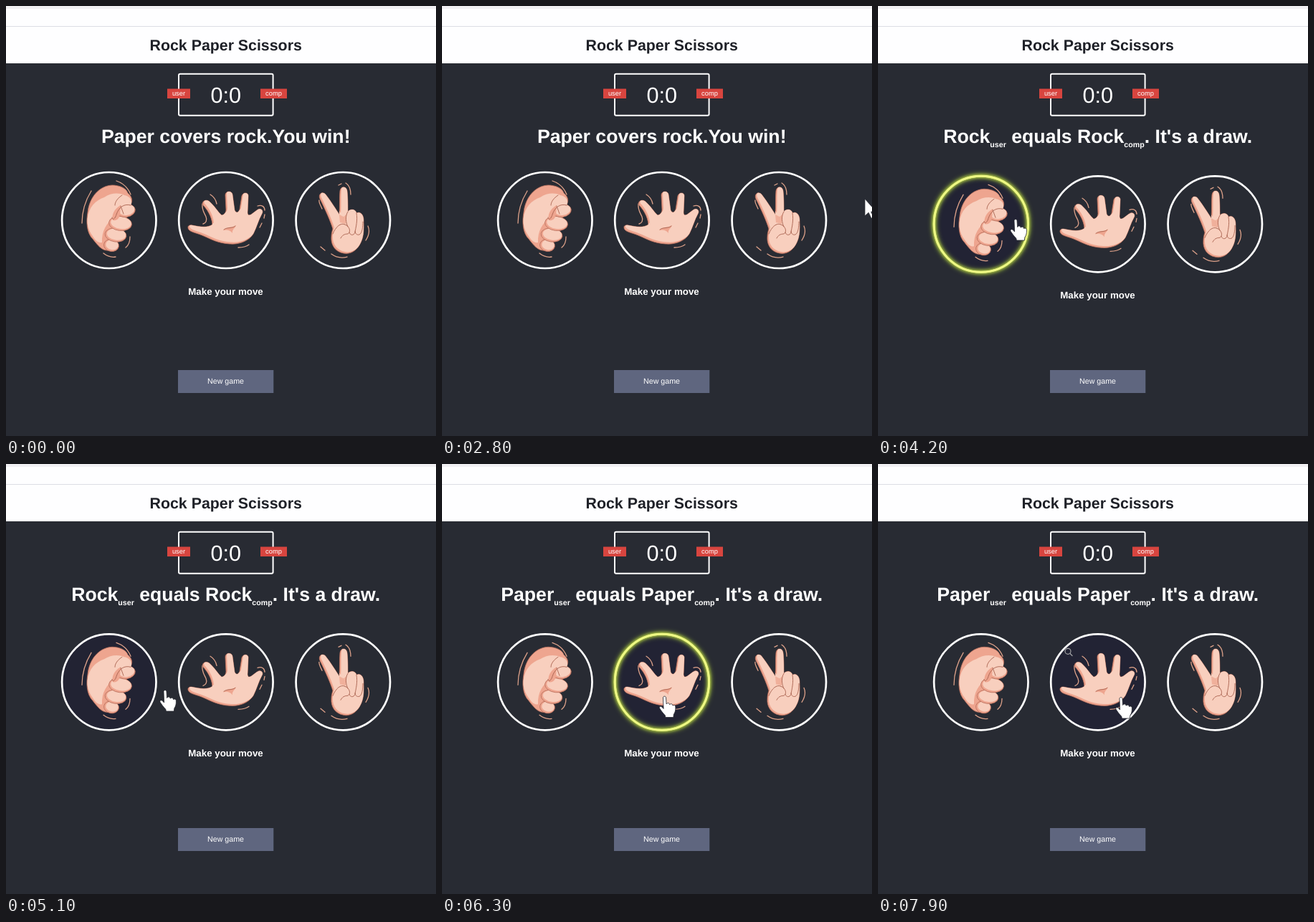
Animation of 600 by 600 pixels, one loop 8000 ms. Source, as an HTML page:

```html
<!DOCTYPE html>
<html lang="en">
<head>
<meta charset="utf-8">
<title>Rock Paper Scissors</title>
<style>
  html, body { margin: 0; width: 100%; height: 100%; overflow: hidden; background: #282b33; }
  svg { display: block; width: 100vw; height: 100vh; }
  text { font-family: "Liberation Sans", Arial, sans-serif; fill: #fff; text-anchor: middle; text-rendering: geometricPrecision; }
  .bold { font-weight: 700; }
  .title { font-size: 21.33px; fill: #1f2128; }
  .score { font-size: 30.67px; }
  .badge { font-size: 9.33px; }
  .result { font-size: 26.67px; }
  .sub { font-size: 10.67px; }
  .message { font-size: 13.33px; }
  .button { font-size: 10.67px; }
  .ring { fill: none; stroke: #fff; stroke-width: 2.7; }
  .fill { fill: #222334; }
  .glow { fill: none; stroke: #eef884; stroke-width: 3; filter: drop-shadow(0 0 2px #d8f04c) drop-shadow(0 0 3px #a9cf3c); }
  .base { fill: #eea58f; stroke: #b9705d; stroke-width: .8; }
  .light { fill: #f8cfbe; }
  .crease { fill: none; stroke: #a9614f; stroke-width: .9; stroke-linecap: round; }
  .shade { fill: #eea58f; }
  .shake { fill: none; stroke: #dda189; stroke-width: 1.3; stroke-linecap: round; }
  .pointer { fill: #fff; stroke: #23252c; stroke-width: .8; stroke-linejoin: round; }
</style>
</head>
<body>
<svg viewBox="0 0 600 600">
  <rect width="600" height="600" fill="#282b33"/>
  <rect width="600" height="80" fill="#fefeff"/>
  <rect width="600" height="4" fill="#f1f0f3"/>
  <rect y="28" width="600" height="1" fill="#dddee4"/>
  <text class="title bold" x="306.7" y="61.5">Rock Paper Scissors</text>

  <rect x="241" y="94.7" width="131.6" height="58" rx="2" fill="none" stroke="#fff" stroke-width="2"/>
  <rect x="225" y="115.5" width="32" height="13.5" fill="#d8453f"/>
  <rect x="355" y="115.5" width="37" height="13.5" fill="#d8453f"/>
  <text class="badge" x="241" y="125.4">user</text>
  <text class="badge" x="373.5" y="125.4">comp</text>
  <text class="score" x="306.7" y="134.6">0:0</text>

  <g id="results"></g>
  <g id="board">
    <g id="choices"></g>
    <text class="message bold" x="306.5" y="402.7">Make your move</text>
    <g id="lens" fill="none" stroke="#a2a3a4" stroke-width="1.2" stroke-linecap="round">
      <circle cx="265" cy="256" r="4"/><path d="M268 259.2L271 262.2"/>
    </g>
  </g>

  <rect x="240" y="508" width="133.3" height="32" fill="#5f667f"/>
  <text class="button" x="306.5" y="527.3">New game</text>

  <g id="cursor">
    <path id="arrow" class="pointer" d="M0 0V24L5.2 19.3L9 27.3L12.3 25.8L8.7 18.2L15.5 17.5Z"/>
    <path id="hand" class="pointer" d="M-2 1.5C-2-1 2-1 2 1.5L2.6 10.5C4 8.3 7 8.6 7 11.2C9 9.4 11.4 10.3 11.4 12.5
      C13.5 11.2 15.4 12.3 15.4 14.5C15.6 19 14.8 22 12.8 25L12.4 29H1.4L.8 26.2C-2.4 22.8-4.5 20-6.8 16.4
      C-8 14-5.6 12.8-4 14.3L-1.4 17Z"/>
  </g>
</svg>
<script>
const LOOP = 8000, STEP = 100, FADE = 300;
const $ = id => document.getElementById(id);

const draw = pick => `${pick}<tspan class="sub" dy="6">user</tspan><tspan dy="-6"> equals ${pick}</tspan>` +
  `<tspan class="sub" dy="6">comp</tspan><tspan dy="-6">. It's a draw.</tspan>`;
const results = [
  { from: 0, html: "Paper covers rock.You win!" },
  { from: 3900, html: draw("Rock") },
  { from: 5800, html: draw("Paper") }
];

const knuckle = (x, y, rx, ry, turn) => `<g transform="translate(${x} ${y}) rotate(${turn})">
  <ellipse class="base" rx="${rx}" ry="${ry}"/>
  <ellipse class="light" cx=".9" cy="-1" rx="${rx - 1.7}" ry="${ry - 1.5}"/></g>`;

// Silhouette in the shade tone with a shifted, clipped light layer on top
const shaded = (id, d, dx, dy) => `<clipPath id="${id}Clip"><path d="${d}"/></clipPath>
  <path class="base" d="${d}"/>
  <g clip-path="url(#${id}Clip)"><path class="light" transform="translate(${dx} ${dy})" d="${d}"/></g>`;

const fist = `
  <path class="base" d="M121 325C112 316 112 300 114 288C116 268 129 251 148 250C158 250 168 254 170 261
    C176 266 177 272 174 277L160 320L143 341C134 342 128 334 121 325Z"/>
  <path class="light" d="M113.6 297C115 281 125 271 137 267C146 261 157 260 165 264C152 269 148 280 150 296
    C141 302 133 314 134 330C128 331 124 326 121 321C115 313 113 305 113.6 297Z"/>
  ${knuckle(147, 334, 10.5, 8.5, 10)}
  ${knuckle(153, 319.5, 15, 9.5, 8)}
  ${knuckle(159.5, 303.5, 16, 10, 6)}
  ${knuckle(167.5, 285.5, 12.8, 9, -8)}
  <path class="light" d="M162 264C171 263 178 271 174 278C165 276 160 283 155 290C153 295 150 298 149 297C144 284 151 268 162 264Z"/>
  <path class="shade" d="M160 278C151 283 147 291 149 299C155 300 158 296 159 291Z"/>
  <path class="crease" d="M174 278C164 275 157 282 154 291C152 298 148 299 148 295M162 264C156 268 152 273 152 278M160 279L164 290"/>`;

const palm = shaded("palm", `M255 312C252 307 256 305 260 306C270 308 281 310 288 305C287 293 280 283 275 278
    C272 272 280 269 284 273C291 279 296 288 301 292C305 291 307 288 307 284L306 264C306 258 315 257 316 263
    L319 285C321 289 324 289 326 284L329 265C331 259 339 260 338 266L337 288C337 293 340 292 342 291L350 285
    C355 281 360 285 357 290C352 299 350 308 345 318C338 329 324 333 312 332C296 331 285 325 276 321C268 317 258 316 255 312Z`, 2, -2.4) + `
  <path class="shade" d="M303 313C309 307 316 310 321 306C319 311 315 312 316 317C312 312 308 312 303 313Z"/>
  <path class="crease" d="M304 312C309 308 315 311 320 307"/>`;

const vee = shaded("vee", `M456 311C453 301 446 285 438 269C435 262 442 258 446 263C453 272 460 283 465 291
    C466 280 465 268 466 258C467 251 475 251 476 258C477 268 477 279 477 287C481 282 488 284 489 289
    C495 286 499 292 499 299C499 308 500 320 495 330C490 341 481 347 471 345C459 343 453 333 454 322C454 318 455 314 456 311Z`, 2, -2) + `
  <path class="shade" d="M465 291L471 294L475 291L474 304L466 302Z" opacity=".75"/>
  <path class="crease" d="M477 287C473 293 474 302 477 308M489 289C491 299 488 309 487 316C485 321 480 320 479 316
    M498 301C498 309 497 317 493 319C489 320 487 317 487 314M456 318C460 308 467 302 473 305C479 307 482 315 477 318C472 318 469 320 467 324"/>`;

const choices = [
  { id: "rock", x: 143.8, art: fist, hover: [[3400, 5060]], glow: [[3900, 4400]],
    shake: "M119 258C111 271 106 287 106 303M154 244C163 247 170 253 174 263M173 322C173 329 171 334 167 337M136 345C141 349 147 351 153 350" },
  { id: "paper", x: 306.9, art: palm, hover: [[3140, 3340], [5230, 6860], [7500, LOOP + FADE]], glow: [[5800, 6300]],
    shake: "M285 263C290 266 293 271 294 276M274 276C273 285 277 289 279 294C281 299 279 303 275 304M351 279C357 277 361 280 361 285M354 309L357 303M361 291L360 296M324 337C330 337 335 336 339 333" },
  { id: "scissors", x: 470.3, art: vee, hover: [[2880, 3080]], glow: [],
    shake: "M464 250L468 248M474 247C479 250 481 256 481 263M437 271C436 274 439 278 441 283M505 307C508 314 506 321 502 327M454 346C461 351 469 352 476 350M439 336L445 341" }
];

$("results").innerHTML = results.map(r => `<text class="result bold" x="306.7" y="191">${r.html}</text>`).join("");
$("choices").innerHTML = choices.map(c => {
  const oval = `cx="${c.x}" cy="299" rx="65.7" ry="67"`;
  return `<ellipse class="fill" id="${c.id}Fill" ${oval}/><ellipse class="ring" ${oval}/>
    <ellipse class="glow" id="${c.id}Glow" ${oval}/><path class="shake" d="${c.shake}"/>${c.art}`;
}).join("");

// time, x, y of the pointer tip
const path = [
  [2800, 590, 269], [3000, 478, 284], [3200, 335, 298], [3400, 222, 303], [3600, 192, 298],
  [4600, 192, 298], [4900, 199, 304], [5100, 222, 316], [5300, 262, 323], [5500, 297, 320],
  [6100, 297, 320], [6500, 324, 329], [6800, 371, 336], [6900, 390, 338], [7200, 394, 338],
  [7500, 362, 332], [7700, 339, 326], [LOOP, 339, 326]
];
const handTimes = [[2900, 3100], [3200, 3400], [3500, 5200], [5300, 6900], [7500, LOOP]];

const clamp = v => Math.max(0, Math.min(1, v));
const ease = v => v * v * (3 - 2 * v);
const level = (t, spans) => Math.max(0, ...spans.map(([a, b]) =>
  ease(Math.min(clamp((t - a) / FADE), 1 - clamp((t - b) / FADE)))));
const within = (t, spans) => spans.some(([a, b]) => t >= a && t < b);
const show = (el, on) => el.style.display = on ? "" : "none";

function pointerAt(t) {
  const i = Math.max(1, path.findIndex(p => p[0] > t));
  const [a, b] = [path[i - 1], path[i]];
  const k = clamp((t - a[0]) / (b[0] - a[0]));
  return [a[1] + (b[1] - a[1]) * k, a[2] + (b[2] - a[2]) * k];
}

function render(now) {
  const t = Math.floor((now % LOOP) / STEP) * STEP;
  const current = results.filter(r => r.from <= t).length - 1;
  [...$("results").children].forEach((el, i) => show(el, i === current));
  $("board").setAttribute("transform", `translate(0 ${current ? 5.3 : 0})`);
  for (const c of choices) {
    $(c.id + "Fill").style.opacity = level(t, c.hover);
    $(c.id + "Glow").style.opacity = level(t, c.glow);
  }
  show($("lens"), t >= 6500);
  show($("cursor"), t >= path[0][0]);
  $("cursor").setAttribute("transform", `translate(${pointerAt(t)})`);
  const hand = within(t, handTimes);
  show($("hand"), hand);
  show($("arrow"), !hand);
}

const start = performance.now();
function tick() {
  render(performance.now() - start);
  requestAnimationFrame(tick);
}
tick();
</script>
</body>
</html>
```
